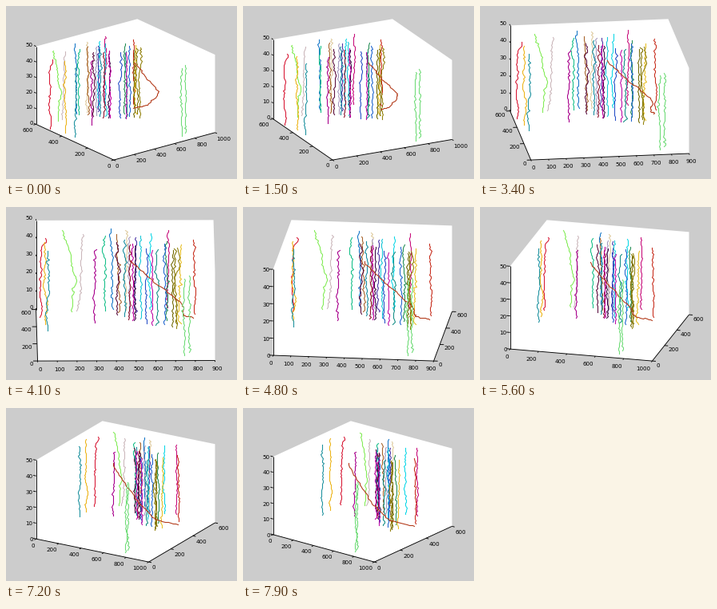
Animation of 289 by 217 pixels, one loop 8 s. Source, as a matplotlib script:

```python
import numpy as np
import matplotlib.pyplot as plt
from matplotlib.animation import FuncAnimation
from matplotlib.collections import LineCollection
from matplotlib.patches import Polygon

W, H, DPI = 289, 217, 100
LEFT, RIGHT, TOP, BOTTOM = 37.6, 261.5, 16.3, 193.1
ELEV = np.radians(30)
HOLD, FRAMES = 4, 80
YMAX, ZMAX = 600, 50
PX = 72 / DPI

# colour, then (x, y) for an upright track
UPRIGHT = [
    ("#edb51c", 42, 410), ("#2093a0", 56, 338),
    ("#18c08a", 350, 540), ("#1878c8", 385, 590), ("#a8008c", 297, 400),
    ("#5c1040", 413, 476), ("#a8642c", 418, 523), ("#188ea0", 448, 454),
    ("#a89cc0", 471, 503), ("#8c1430", 471, 447), ("#e0cca0", 455, 560),
    ("#5038a8", 505, 511), ("#3c0c44", 498, 425), ("#c000a0", 490, 415),
    ("#18c8d8", 530, 475), ("#2850c8", 558, 386), ("#c010a8", 589, 360),
    ("#189088", 608, 381), ("#2468d0", 648, 382), ("#10d8e8", 580, 570),
    ("#c8107c", 670, 590), ("#289058", 662, 436), ("#e8c028", 730, 400),
    ("#847808", 704, 372), ("#948410", 714, 352), ("#746c08", 692, 380),
    ("#c83020", 803, 474), ("#70dc78", 745, 55), ("#70dc78", 770, 48),
]
# colour, then (x, y, z) nodes from the bottom up
BENT = [
    ("#d81c38", [(24, 505, 0), (24, 515, 39), (45, 515, 42), (45, 510, 44)]),
    ("#84ec58", [(178, 570, 0), (198, 568, 17), (172, 570, 30), (137, 568, 46)]),
    ("#ccb8bc", [(208, 560, 1), (225, 562, 22), (238, 560, 44)]),
    ("#b43c1c", [(795, 472, 1), (790, 445, 3), (752, 320, 10),
                 (728, 217, 23), (600, 215, 34), (472, 210, 45.6)]),
]

rng = np.random.default_rng(12)


def wander(n, size):
    noise = rng.normal(0, size * 0.6, n)
    drift = np.zeros(n)
    for i in range(1, n):
        drift[i] = 0.85 * drift[i - 1] + rng.normal(0, size * 0.6)
    return noise + drift


def make_track(nodes):
    x, y, z = np.array(nodes, float).T
    zs = np.arange(z[0], z[-1] + 0.5, 1.0)
    n = len(zs)
    return (np.interp(zs, z, x) + wander(n, 4),
            np.interp(zs, z, y) + wander(n, 3), zs)


tracks = []
for color, x, y in UPRIGHT:
    low, high = rng.uniform(0, 3), rng.uniform(43, 47)
    tracks.append((color, make_track([(x, y, low), (x, y, high)])))
tracks += [(color, make_track(nodes)) for color, nodes in BENT]

fig = plt.figure(figsize=(W / DPI, H / DPI), dpi=DPI, facecolor="#cccccc")
ax = fig.add_axes([0, 0, 1, 1])
ax.set_xlim(0, W)
ax.set_ylim(H, 0)
ax.axis("off")

box = ax.add_patch(Polygon([(0, 0)] * 3, fc="white", ec="none", zorder=0))
frame = LineCollection([], colors="black", linewidths=0.9 * PX, zorder=1)
ax.add_collection(frame)
lines = [ax.plot([], [], color=c, lw=1.1 * PX, snap=False)[0] for c, _ in tracks]
labels = []


class View:
    """Orthographic view of a unit cube, stretched to fill the plot area."""

    def __init__(self, az):
        self.s, self.c = np.sin(np.radians(az)), np.cos(np.radians(az))
        self.left = min(0, self.s)
        self.wide = self.c + abs(self.s)
        self.low = min(0, -self.s) * np.sin(ELEV)
        self.tall = self.wide * np.sin(ELEV) + np.cos(ELEV)

    def __call__(self, u, v, w):
        sx = u * self.c + v * self.s
        sy = (v * self.c - u * self.s) * np.sin(ELEV) + w * np.cos(ELEV)
        px = LEFT + (RIGHT - LEFT) * (sx - self.left) / self.wide
        py = BOTTOM - (BOTTOM - TOP) * (sy - self.low) / self.tall
        return px, py

    def depth(self, u, v):
        return v * self.c - u * self.s


def put(x, y, value, align):
    labels.append(ax.text(x, y, str(value), fontsize=7.2 * PX, family="DejaVu Sans",
                          ha=align, va="center_baseline", color="black", zorder=9))


def draw(i):
    az = -37.5 + max(0, i - HOLD)
    view = View(az)
    xmax, xstep = (900, 100) if abs(az) < 9 else (1000, 200)
    tilt = min(1, abs(view.s) / 0.6)
    neg = az < 0
    side = 0 if neg else 1          # u of the y axis
    back = 1 if neg else 0          # v of the z axis
    out = -1 if neg else 1

    # silhouette of the box
    if neg:
        ring = [(0, 0, 0), (1, 0, 0), (1, 0, 1), (1, 1, 1), (0, 1, 1), (0, 1, 0)]
    else:
        ring = [(0, 0, 0), (1, 0, 0), (1, 1, 0), (1, 1, 1), (0, 1, 1), (0, 0, 1)]
    box.set_xy([view(*p) for p in ring])

    segs = [[view(0, 0, 0), view(1, 0, 0)],
            [view(side, 0, 0), view(side, 1, 0)],
            [view(0, back, 0), view(0, back, 1)]]
    while labels:
        labels.pop().remove()

    tick = 0.025
    for x in range(0, xmax + 1, xstep):
        u = x / xmax
        p = view(u, 0, 0)
        segs.append([p, view(u, -tick, 0)])
        down = p[1] + 10 - 2.5 * tilt
        if abs(az) < 12:
            put(p[0] - out * 3, down, x, "center")
        else:
            put(p[0] - out * 2, down, x, "left" if neg else "right")
    for y in range(0, YMAX + 1, 200):
        v = y / YMAX
        p = view(side, v, 0)
        segs.append([p, view(side + out * tick, v, 0)])
        put(p[0] + out * (6 - 2.5 * tilt), p[1] + 3.5 + 4 * tilt, y,
            "right" if neg else "left")
    for z in range(0, ZMAX + 1, 10):
        w = z / ZMAX
        p = view(0, back, w)
        end = view(0, 1 + tick, w) if neg else view(-tick, 0, w)
        segs.append([p, end])
        put(p[0] - 4, p[1] + 0.8 + (end[1] - p[1]) * (2.5 if neg else 0.5), z, "right")
    frame.set_segments(segs)

    for line, (_, (x, y, z)) in zip(lines, tracks):
        u, v = x / xmax, y / YMAX
        px, py = view(u, v, z / ZMAX)
        line.set_data(np.floor(px) + 0.5, np.floor(py) + 0.5)
        line.set_zorder(5 - view.depth(u.mean(), v.mean()))
    return [box, frame, *lines, *labels]


anim = FuncAnimation(fig, draw, frames=FRAMES, interval=100, repeat=True, blit=False)
plt.show()
```
